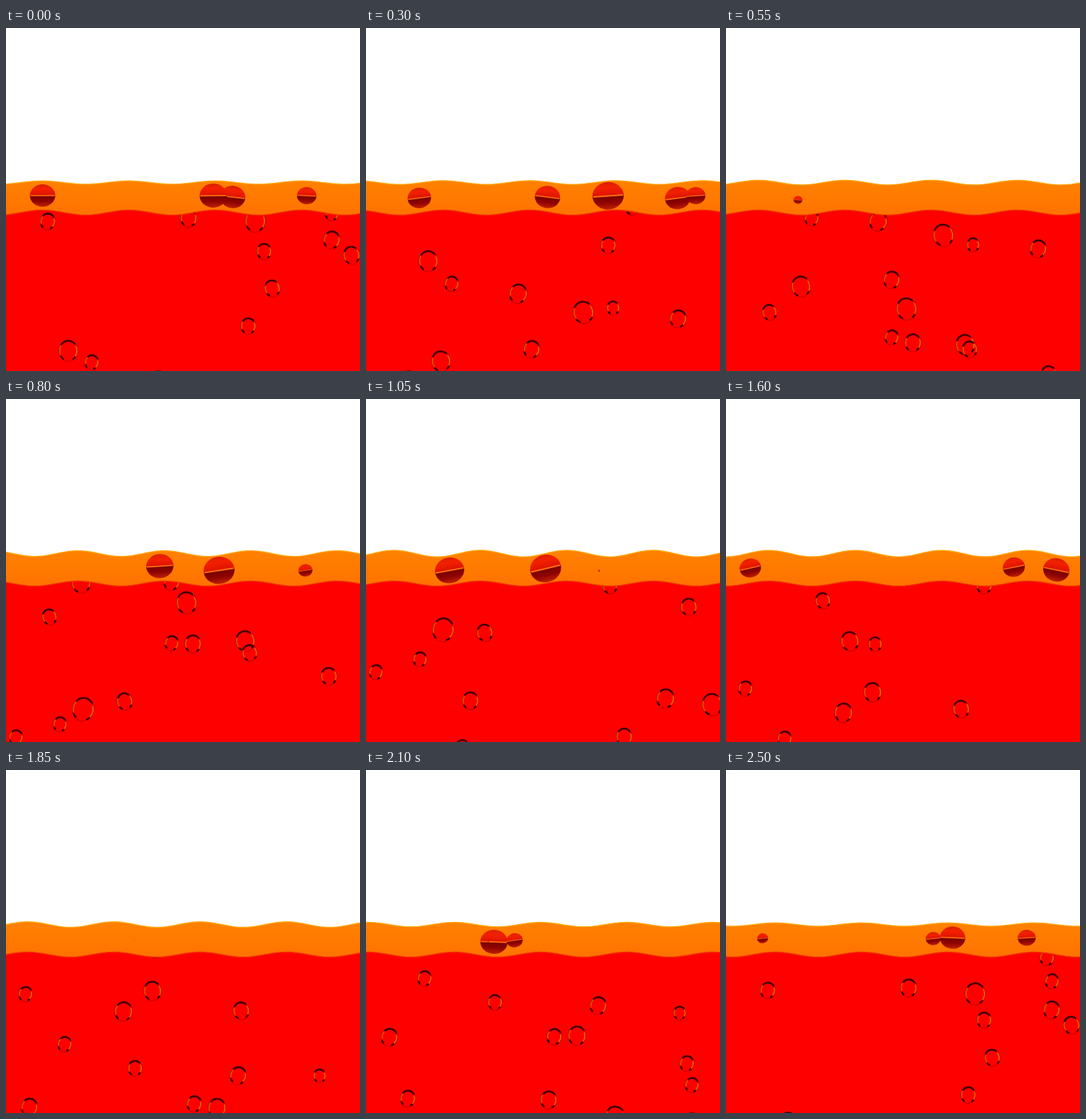
An HTML page with a canvas that plays this animation: 500x485 px, repeating every 2550 ms.

```html
<!DOCTYPE html>
<html lang="en">
<head>
<meta charset="utf-8">
<title>Fizzy drink</title>
<style>
  html, body { margin: 0; width: 100%; height: 100%; overflow: hidden; background: #fff; }
  canvas { display: block; width: 500px; height: 485px; }
</style>
</head>
<body>
<canvas id="stage" width="500" height="485"></canvas>
<script>
const ctx = document.getElementById('stage').getContext('2d');
const W = 500, H = 485, LOOP = 2550, STEP = 50;
const CYCLE = 2600; // the liquid's own period; the loop cuts one step short
const TAU = Math.PI * 2;
const SURFACE = 262, WAVE_LENGTH = 122;
const BLOB_DELAY = 50, BLOB_GROWTH = 130, BLOB_LIFE = 330;

// Bubbles that swell into blobs in the foam: x, time of reaching the foam, radius
const bubbles = [
  [258, 17, 13], [352, 25, 16], [59, 30, 12], [460, 95, 13], [488, 150, 13],
  [88, 460, 15], [215, 578, 14], [307, 621, 16], [441, 677, 13], [106, 795, 15],
  [255, 860, 16], [338, 990, 15], [264, 1013, 13], [234, 1026, 11], [109, 1193, 17],
  [14, 1387, 11], [489, 1440, 16], [423, 1445, 14], [175, 1797, 14], [207, 1973, 14],
  [166, 2044, 14], [328, 2280, 13], [443, 2330, 10], [298, 2378, 14], [33, 2393, 13]
].map(([x, arrival, r]) => ({ x, arrival, r, swells: true }));

let seed = 7;
const random = () => (seed = seed * 16807 % 2147483647) / 2147483647;

// Smaller bubbles that dissolve at the foam
const SMALL = 22;
for (let i = 0; i < SMALL; i++) {
  const arrival = (i + random()) * CYCLE / SMALL;
  bubbles.push({ x: random() * W, arrival, r: 10 + 3 * random() });
}

// Signed time since a moment, taken the short way round the cycle
const since = (moment, t) => (t - moment + CYCLE * 1.5) % CYCLE - CYCLE / 2;

// The waves run left, four lengths per cycle, and swell once in the middle
function waves(t) {
  const swell = Math.sin(Math.PI * t / CYCLE) ** 2;
  const shift = 4 * t / CYCLE + 1.627 + .53 * swell;
  const wave = (y, height) => x =>
    y - height * Math.cos(TAU * ((x - W / 2) / WAVE_LENGTH + shift));
  return { upper: wave(218.6, 2.3 + 2.5 * swell), lower: wave(261, 3.5) };
}

function tracePath(f) {
  ctx.beginPath();
  for (let x = 0; x <= W; x += 4) ctx.lineTo(x, f(x));
}

function fillBelow(f, color) {
  tracePath(f);
  ctx.lineTo(W, H);
  ctx.lineTo(0, H);
  ctx.fillStyle = color;
  ctx.fill();
}

function strokeEdge(f, color) {
  tracePath(f);
  ctx.strokeStyle = color;
  ctx.lineWidth = 1.4;
  ctx.stroke();
}

function arc(r, from, to, color, width) {
  ctx.beginPath();
  ctx.ellipse(0, 0, r * .9, r, 0, from, to);
  ctx.strokeStyle = color;
  ctx.lineWidth = width;
  ctx.stroke();
}

function drawBubble({ x, arrival, r }, t) {
  const speed = .22 + .0135 * r;
  const y = SURFACE - speed * since(arrival, t);
  if (y < SURFACE - r || y > H + r) return;
  ctx.save();
  ctx.translate(x, y);
  ctx.rotate(.25 * Math.sin(x));
  arc(r, 0, TAU, '#c00000', 1);
  arc(r - 1.5, 2.7, 3.7, '#d85000', 1.8);
  arc(r - 1.5, -.5, .6, '#e86000', 1.8);
  arc(r - 1, 3.75, 5.6, '#400000', 2.5);
  arc(r - 1, 2.1, 2.6, '#400000', 2.5);
  arc(r - 1, .65, 1.05, '#400000', 2.5);
  ctx.restore();
}

// Blobs drift towards the middle and lean with the wave above them
function drawBlob({ x, arrival, r }, t, { upper, lower }) {
  const age = since(arrival, t);
  if (age <= BLOB_DELAY || age >= BLOB_LIFE) return;
  const size = 1.38 * r * Math.min(1, (age - BLOB_DELAY) / BLOB_GROWTH);
  const px = x + (240 - x) * .09;
  ctx.save();
  ctx.translate(px, (upper(px) + lower(px)) / 2);
  ctx.rotate((upper(px + 5) - upper(px - 5)) / 10);
  ctx.scale(size, size * .88);
  ctx.beginPath();
  ctx.arc(0, 0, 1, 0, TAU);
  ctx.fillStyle = blobShade;
  ctx.fill();
  ctx.fillStyle = '#ff7010';
  ctx.fillRect(-.95, -.04, 1.9, .1);
  ctx.restore();
}

function gradient(y0, y1, ...stops) {
  const g = ctx.createLinearGradient(0, y0, 0, y1);
  for (const [at, color] of stops) g.addColorStop(at, color);
  return g;
}

const foam = gradient(214, 264, [0, '#ff8200'], [1, '#ff7200']);
const blobShade = gradient(-1, 1, [0, '#d82000'], [.2, '#f42000'], [.5, '#dc1400'],
  [.53, '#780000'], [.75, '#900400'], [1, '#c02000']);

function draw(t) {
  const { upper, lower } = waves(t);
  ctx.fillStyle = '#fff';
  ctx.fillRect(0, 0, W, H);
  fillBelow(upper, foam);
  strokeEdge(upper, '#ffa400');
  for (const b of bubbles) if (b.swells) drawBlob(b, t, { upper, lower });

  ctx.save();
  fillBelow(lower, '#f00');
  ctx.clip();
  for (const b of bubbles) drawBubble(b, t);
  ctx.restore();
  strokeEdge(lower, '#f03000');
}

const start = performance.now();
function tick() {
  const t = (performance.now() - start) % LOOP;
  draw(Math.floor(t / STEP) * STEP);
  requestAnimationFrame(tick);
}
tick();
</script>
</body>
</html>
```
